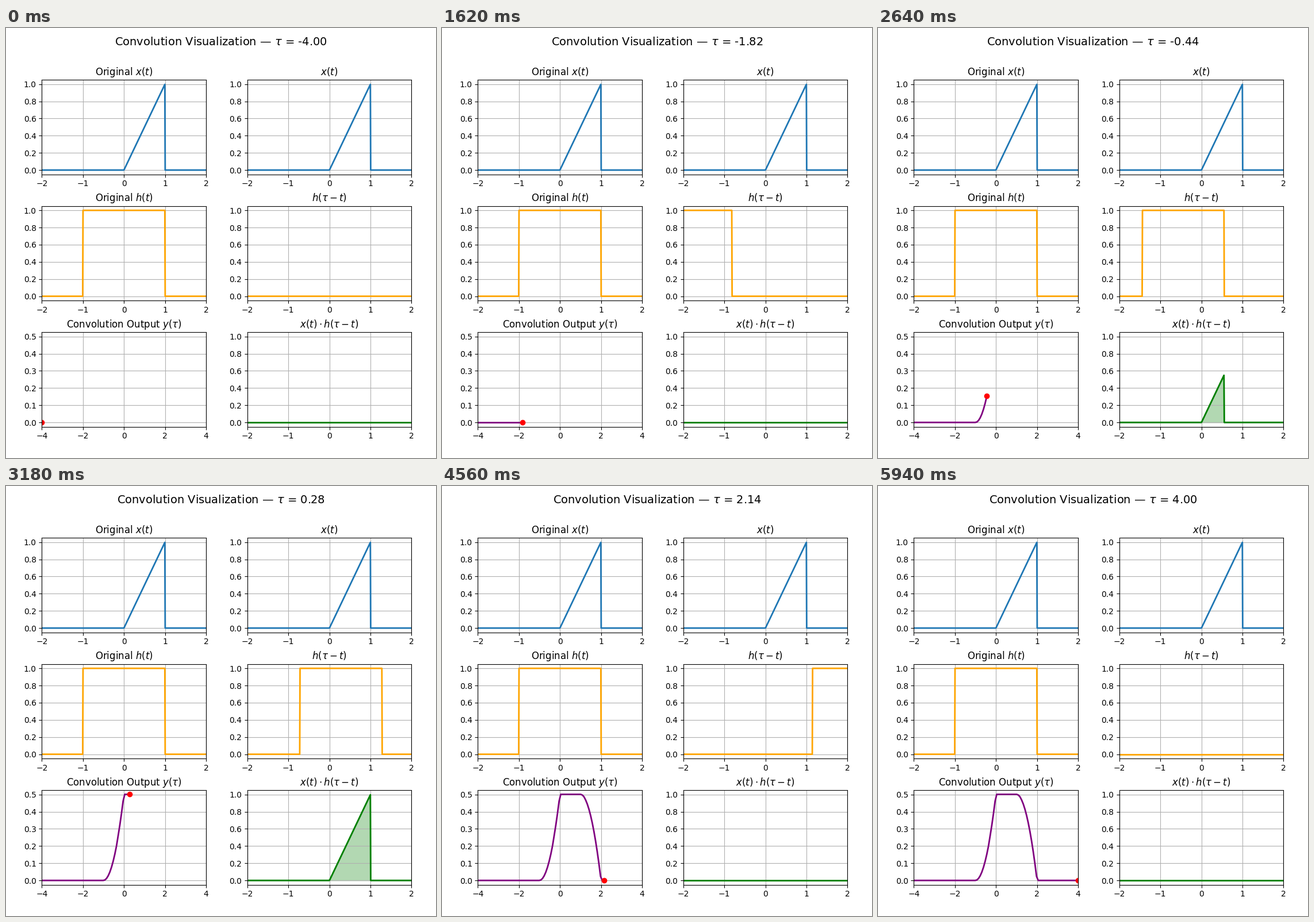
These frames come from a looping animation (748 px wide and 748 px high, 6000 ms). A matplotlib script:

```python
import numpy as np
import matplotlib.pyplot as plt
from matplotlib.animation import FuncAnimation

SIZE = 748
FRAMES = 100
INTERVAL = 60
WIDTH, HEIGHT = 285.5, 164.4
LEFTS = (62.4, 419.9)
TOPS = (90.2, 309.7, 529.2)

t = np.linspace(-4, 4, 1000)
dt = t[1] - t[0]
taus = np.linspace(-4, 4, FRAMES)


def x(s):
    return np.where((s >= 0) & (s <= 1), s, 0.0)


def h(s):
    return np.where(np.abs(s) <= 1, 1.0, 0.0)


ramp = x(t)
output = np.array([np.sum(ramp * h(tau - t)) * dt for tau in taus])

fig = plt.figure(figsize=(SIZE / 100, SIZE / 100), dpi=100)
heading = fig.suptitle("", fontsize=14, y=0.98)


def panel(row, col, title, xmax=2, ymax=1.0):
    """Add one gridded plot placed in pixels from the top left."""
    bottom = SIZE - TOPS[row] - HEIGHT
    ax = fig.add_axes([LEFTS[col] / SIZE, bottom / SIZE,
                       WIDTH / SIZE, HEIGHT / SIZE])
    ax.set_title(title)
    ax.set_xlim(-xmax, xmax)
    ax.set_ylim(-0.05 * ymax, 1.05 * ymax)
    ax.set_xticks(np.linspace(-xmax, xmax, 5))
    ax.set_yticks(np.arange(0, ymax + 0.01, 0.2 * ymax))
    ax.grid(True)
    return ax


for col, title in enumerate(("Original $x(t)$", "$x(t)$")):
    panel(0, col, title).plot(t, ramp, lw=2)

panel(1, 0, "Original $h(t)$").plot(t, h(t), color="orange", lw=2)
window, = panel(1, 1, r"$h(\tau - t)$").plot([], [], color="orange", lw=2)

out_ax = panel(2, 0, r"Convolution Output $y(\tau)$", xmax=4, ymax=0.5)
trace, = out_ax.plot([], [], color="purple", lw=2)
dot, = out_ax.plot([], [], "ro")

prod_ax = panel(2, 1, r"$x(t) \cdot h(\tau - t)$")
product, = prod_ax.plot([], [], color="green", lw=2)
area = prod_ax.fill_between(t, 0 * t, color="green", alpha=0.3)


def update(i):
    tau = taus[i]
    shifted = h(tau - t)
    overlap = ramp * shifted
    heading.set_text(rf"Convolution Visualization — $\tau$ = {tau:.2f}")
    window.set_data(t, shifted)
    product.set_data(t, overlap)
    outline = np.column_stack([t, overlap])
    area.set_verts([np.vstack([outline, [(4, 0), (-4, 0)]])])
    trace.set_data(taus[:i + 1], output[:i + 1])
    dot.set_data([tau], [output[i]])
    return heading, window, product, area, trace, dot


anim = FuncAnimation(fig, update, frames=FRAMES, interval=INTERVAL,
                     init_func=lambda: update(0), repeat=True, repeat_delay=0)
plt.show()
```
